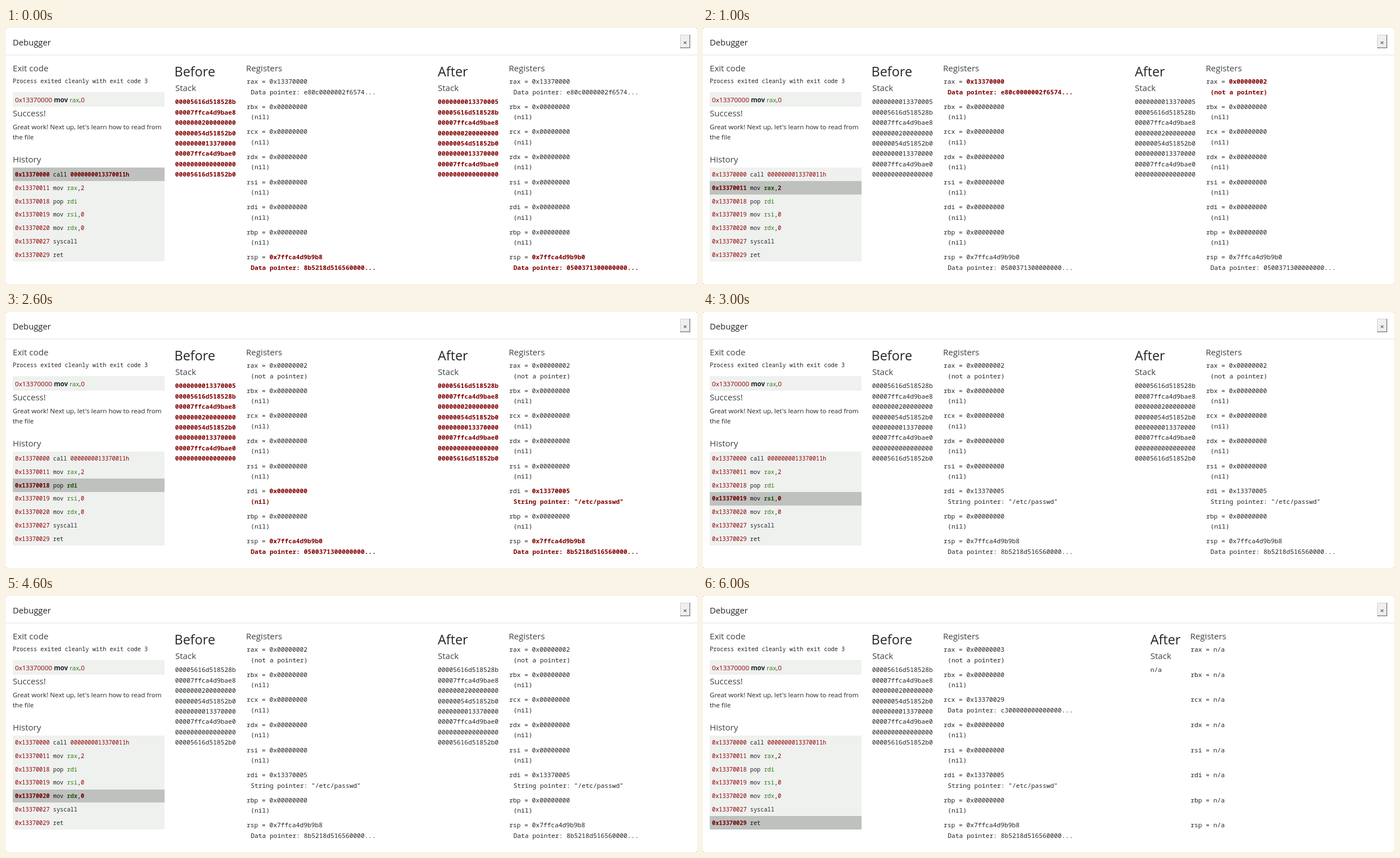
An HTML page for the animation above (7 s loop, 1229x455 px).

```html
<!DOCTYPE html>
<html lang="en">
<head>
<meta charset="utf-8">
<title>Debugger</title>
<style>
  html, body { margin: 0; width: 100%; height: 100%; overflow: hidden; background: #808080; }
  svg { display: block; width: 1229px; height: 455px; }
  text { fill: #212529; white-space: pre; font: 11.66px "Open Sans", "Noto Sans", sans-serif; }
  .title { font-size: 14.8px; }
  .head { font-size: 15.1px; fill: #3d4145; }
  .big { font-size: 23.4px; }
  .mono { font: 500 11.26px "Noto Sans Mono", "DejaVu Sans Mono", monospace; }
  .small { font: 500 10.27px "Noto Sans Mono", "DejaVu Sans Mono", monospace; }
  .num { fill: #8b0000; }
  .reg { fill: #2f7a10; }
  .bold, .on .num, .on .reg { font-weight: bold; }
  .on .num { fill: #6a0000; }
  .on .reg { fill: #1d5208; }
  .on { fill: #111; }
  .changed { font-weight: bold; fill: #800000; }
  #film { animation: step 7s steps(7) infinite; }
  @keyframes step { to { transform: translateY(-3185px); } }
</style>
</head>
<body>
<svg viewBox="0 0 1229 455">
  <rect width="1229" height="455" rx="2" fill="#fff"/>
  <rect y="47.5" width="1229" height="1" fill="#dee2e6"/>
  <text class="title" x="12" y="31">Debugger</text>

  <rect x="1199" y="12" width="18" height="24" fill="#efefef"/>
  <path d="M1199.5 35V12.5H1216" fill="none" stroke="#d0d0d0"/>
  <path d="M1199 35.25H1216.25V12" fill="none" stroke="#858585" stroke-width="1.5"/>
  <text x="1207.8" y="30" text-anchor="middle">×</text>

  <text class="head" x="12" y="77">Exit code</text>
  <text class="small" x="12" y="98">Process exited cleanly with exit code 3</text>
  <rect x="12" y="114" width="270" height="26" fill="#eff1ef"/>
  <text x="16" y="132"><tspan class="num">0x13370000</tspan> <tspan class="bold">mov</tspan> <tspan class="reg">rax</tspan>,<tspan class="num">0</tspan></text>
  <text class="head" x="12" y="157">Success!</text>
  <text x="12" y="180">Great work! Next up, let's learn how to read from</text>
  <text x="12" y="198">the file</text>
  <text class="head" x="12" y="239">History</text>
  <rect x="12" y="248" width="270" height="167" fill="#eff1ef"/>
  <text class="big" x="299.5" y="86">Before</text>
  <text class="head" x="301" y="112">Stack</text>
  <text class="head" x="427" y="77">Registers</text>
  <g id="film"></g>
</svg>
<script>
const ROW = 18.45, GROUP = 44.57, LINE = 23.83, INDENT = 7.4;
const program = [
  "0x13370000 call 0000000013370011h",
  "0x13370011 mov rax,2",
  "0x13370018 pop rdi",
  "0x13370019 mov rsi,0",
  "0x13370020 mov rdx,0",
  "0x13370027 syscall",
  "0x13370029 ret"
];
const memory = ["13370005", "5616d518528b", "7ffca4d9bae8", "200000000", "54d51852b0",
  "13370000", "7ffca4d9bae0", "0", "5616d51852b0"].map(v => v.padStart(16, "0"));
const names = ["rax", "rbx", "rcx", "rdx", "rsi", "rdi", "rbp", "rsp"];
const nil = ["0x00000000", "(nil)"];
const data = (value, bytes) => [value, `Data pointer: ${bytes}...`];

// Machine state before instruction i
function stateAt(i) {
  const pushed = i === 1 || i === 2;
  const rax = i < 2 ? data("0x13370000", "e80c0000002f6574")
    : [i < 6 ? "0x00000002" : "0x00000003", "(not a pointer)"];
  return {
    stack: memory.slice(pushed ? 0 : 1).slice(0, 8),
    regs: {
      rax,
      rcx: i < 6 ? nil : data("0x13370029", "c300000000000000"),
      rdi: i < 3 ? nil : ["0x13370005", 'String pointer: "/etc/passwd"'],
      rsp: pushed ? data("0x7ffca4d9b9b0", "0500371300000000")
        : data("0x7ffca4d9b9b8", "8b5218d516560000")
    }
  };
}

// Baselines sit on whole pixels
const text = (x, y, cls, body) =>
  `<text x="${x}" y="${Math.round(y)}" class="${cls}">${body}</text>`;
const span = (cls, body) => `<tspan class="${cls}">${body}</tspan>`;
const lineTop = i => Math.round(248.2 + i * LINE);
const stackY = i => 135.2 + i * ROW;
const regY = i => 99.3 + i * GROUP;

function history(active) {
  const top = lineTop(active), height = lineTop(active + 1) - top;
  const bar = `<rect x="12" y="${top}" width="270" height="${height}" fill="#bfc1bf"/>`;
  return bar + program.map((code, i) => {
    const body = code.replace(/\b(0x\d+|\d+h?)\b|\b(r[ads][xi]|rdi)\b/g,
      m => span(m[0] === "r" ? "reg" : "num", m));
    return text(16, 264 + i * LINE, i === active ? "small on" : "small", body);
  }).join("");
}

function panel(state, other, stackX, regX) {
  const mark = changed => changed ? "changed" : "";
  const moved = other && state.stack[0] !== other.stack[0];
  const stack = state.stack.map((v, i) =>
    text(stackX, stackY(i), "mono", span(mark(moved), v)));
  const regs = names.map((name, i) => {
    const [value, note] = state.regs[name] || nil;
    const cls = mark(other && value !== (other.regs[name] || nil)[0]);
    return text(regX, regY(i), "mono", `${name} = ${span(cls, value)}`) +
      text(regX + INDENT, regY(i) + ROW, "mono", span(cls, note));
  });
  return stack.concat(regs).join("");
}

function afterPanel(before, after) {
  const stackX = after ? 768 : 795.7, regX = after ? 895 : 867.3;
  const heads = text(stackX, 86, "big", "After") + text(stackX, 112, "head", "Stack") +
    text(regX - 0.8, 77, "head", "Registers");
  if (after) return heads + panel(after, before, stackX, regX);
  return heads + text(stackX, stackY(0), "mono", "n/a") +
    names.map((name, i) => text(regX, regY(i), "mono", `${name} = n/a`)).join("");
}

document.getElementById("film").innerHTML = program.map((_, i) => {
  const before = stateAt(i);
  const after = i < program.length - 1 ? stateAt(i + 1) : null;
  return `<g transform="translate(0 ${i * 455})">` + history(i) +
    panel(before, after, 300.7, 427.9) + afterPanel(before, after) + "</g>";
}).join("");
</script>
</body>
</html>
```
